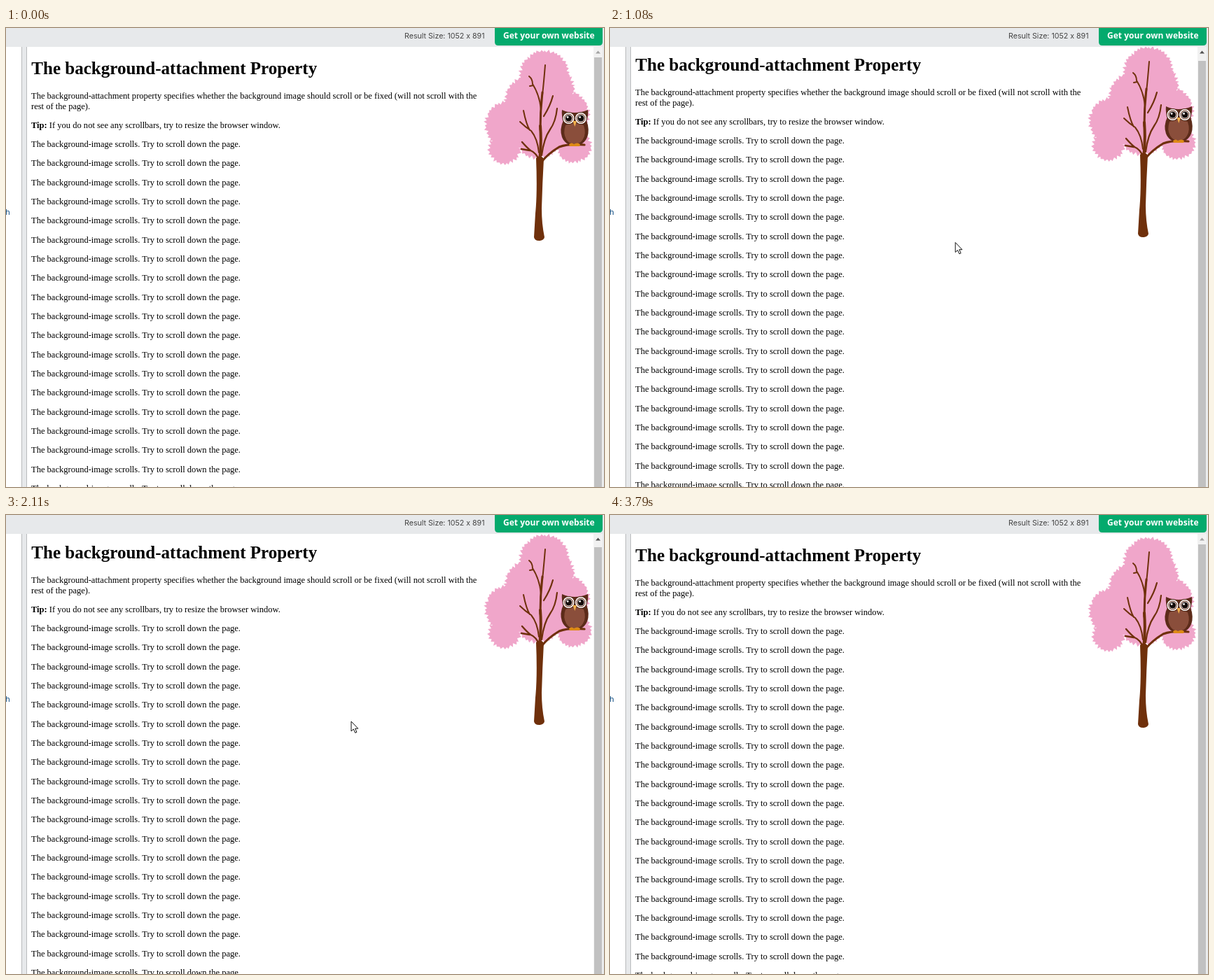
An HTML page for the animation above (4060 ms loop, 854 by 656 pixels).

```html
<!DOCTYPE html>
<html lang="en">
<head>
<meta charset="utf-8">
<title>Scrolling background</title>
<style>
  html, body { margin: 0; width: 100%; height: 100%; overflow: hidden; background: #e7e9eb; }
  svg { display: block; }
  .page { font: 12.53px "Liberation Serif", "Times New Roman", serif; fill: #000; }
  .page .title { font-size: 25.04px; font-weight: bold; }
  .bold { font-weight: bold; }
  .size { font: 10.65px Inter, sans-serif; fill: #444; }
  .button { font: bold 12.06px "Open Sans", "Noto Sans", sans-serif; fill: #fff; }
  .code { font: 11px "Noto Sans", sans-serif; fill: #0b4a80; }
  .wood { fill: none; stroke: #6f300b; stroke-linecap: round; stroke-linejoin: round; }
</style>
</head>
<body>
<svg width="854" height="656" viewBox="0 0 854 656">
  <defs>
    <clipPath id="view"><rect x="30" y="27" width="809" height="629"/></clipPath>
    <g id="eye">
      <circle r="9" fill="#4b2313"/>
      <circle r="8" fill="#fff"/>
      <circle r="6.4" fill="#6b3420"/>
      <circle r="5.4" fill="#fff"/>
      <circle r="4.6" fill="#140b08"/>
      <circle cx="-1.4" cy="-1.6" r="1.4" fill="#fff"/>
    </g>
  </defs>

  <rect width="854" height="656" fill="#e7e9eb"/>
  <rect y="27" width="22" height="629" fill="#fff"/>
  <rect x="22" y="27" width="1" height="629" fill="#b9bbbd"/>
  <rect x="29" y="27" width="1" height="629" fill="#b9bbbd"/>
  <rect x="30" y="27" width="809" height="629" fill="#fff"/>
  <text class="code" x="-1" y="266.5">h</text>
  <text class="size" x="569" y="15">Result Size: 1052 x 891</text>
  <path d="M698 0H852V20Q852 25 847 25H703Q698 25 698 20Z" fill="#04aa6d"/>
  <text class="button" x="710" y="15">Get your own website</text>

  <g clip-path="url(#view)">
    <g id="page" class="page">
      <path id="leaves" fill="#f0a6ca"/>
      <path fill="#6f300b" d="M757 186Q759 235 756 265L754 299Q755 304 761 304Q768 304 769 299Q765 280 765 258Q766 222 768 187Q763 180 757 186Z"/>
      <g class="wood">
        <path stroke-width="4" d="M762 190Q765 165 763 140"/>
        <path stroke-width="3" d="M763 145Q763 118 766 92"/>
        <path stroke-width="2" d="M766 96Q768 78 770 53M747 69Q752 73 752 80Q762 96 764 116M753 82L748 83"/>
        <path stroke-width="2" d="M734 134Q741 141 750 147Q759 158 761 178M739 118Q743 138 748 146"/>
        <path stroke-width="2.4" d="M737 163Q744 171 749 175Q757 178 762 190M736 173L748 175"/>
        <path stroke-width="2.2" d="M787 115Q785 134 777 145Q768 158 765 182M781 97Q777 112 768 126"/>
        <path stroke-width="3.2" d="M765 191Q775 179 790 170Q804 165 826 167"/>
      </g>
      <path fill="#5c2b19" d="M794 117Q802 121 812 121Q822 121 831 117Q832 125 829 132Q834 146 830 156Q825 168 812 168Q799 168 794 156Q790 145 796 132Q793 125 794 117Z"/>
      <path fill="#8a4e3b" d="M799 139Q812 133 825 139Q829 151 824 159Q820 166 812 166Q804 166 800 159Q795 150 799 139Z"/>
      <use href="#eye" x="803.5" y="129"/>
      <use href="#eye" x="821" y="129"/>
      <path fill="#f3b04b" d="M809.5 133H815L812.3 141Z"/>
      <path fill="#dd8a16" d="M804 166Q808 163 811 166Q816 163 820 166L819 169H805Z"/>
      <text class="title" x="36.3" y="66">The background-attachment Property</text>
      <text x="36" y="101">The background-attachment property specifies whether the background image should scroll or be fixed (will not scroll with the</text>
      <text x="36" y="116">rest of the page).</text>
      <text x="36" y="143"><tspan class="bold">Tip:</tspan> If you do not see any scrollbars, try to resize the browser window.</text>
    </g>
  </g>

  <rect x="839" y="27" width="13" height="629" fill="#f1f1f1"/>
  <path id="arrow" d="M842 36.5L845.5 32.5L849 36.5Z"/>
  <rect id="thumb" x="840" y="42" width="11" height="640"/>
  <path id="cursor" d="M0 0V14L3.3 11L5.7 16.3L7.9 15.3L5.6 10.2H9.8Z" fill="#fff" stroke="#111"/>
</svg>
<script>
const LOOP = 4060, STEP = 67.6;
const get = id => document.getElementById(id);
const page = get("page"), arrow = get("arrow"), thumb = get("thumb"), cursor = get("cursor");

let seed = 11;
const random = () => (seed = seed * 16807 % 2147483647) / 2147483647;

// A round clump of leaves with an uneven, toothed rim.
function clump([x, y, r]) {
  const teeth = Math.round(r * 1.1);
  let d = "";
  for (let i = 0; i < teeth * 2; i++) {
    const a = (i + random() * 0.7) * Math.PI / teeth;
    const rim = r + (i % 2 ? -1 - 3 * random() : 2 * random());
    d += (i ? "L" : "M") + (x + rim * Math.cos(a)).toFixed(1) + " " + (y + rim * Math.sin(a)).toFixed(1);
  }
  return d + "Z";
}

// Center and radius of each clump in the crown.
const crown = [
  [769, 68, 36], [748, 104, 36], [718, 138, 34], [712, 172, 23],
  [760, 154, 33], [786, 86, 26], [799, 123, 34], [811, 168, 25]
];
get("leaves").setAttribute("d", crown.map(clump).join(""));

for (let i = 0; i < 19; i++) {
  const line = document.createElementNS("http://www.w3.org/2000/svg", "text");
  line.setAttribute("x", 36);
  line.setAttribute("y", 170 + Math.round(i * 27.34));
  line.textContent = "The background-image scrolls. Try to scroll down the page.";
  page.append(line);
}

// The wheel rocks the page down and up at a steady beat.
const RANGE = 6, BEAT = 256, FIRST = 220, BEATS = 9;
function scrollAt(t) {
  const beat = (t - FIRST) / BEAT;
  if (beat < 0 || beat > BEATS) return 0;
  return Math.round(RANGE * (1 - Math.cos(beat * 2 * Math.PI)) / 2);
}

// Pointer stops: time, x, y.
const stops = [
  [0, 528, 690], [340, 496, 345], [880, 492, 314], [1350, 495, 295], [1620, 496, 293],
  [2095, 493, 295], [2500, 640, 690], [3000, 850, 670], [3040, 849, 646],
  [3245, 808, 628], [3450, 822, 670], [LOOP, 822, 670]
];
function pointerAt(t) {
  const i = stops.findIndex(s => s[0] > t);
  const [t0, x0, y0] = stops[i - 1], [t1, x1, y1] = stops[i];
  const f = (t - t0) / (t1 - t0), ease = f * f * (3 - 2 * f);
  return [x0 + (x1 - x0) * ease, y0 + (y1 - y0) * ease];
}

function draw(now) {
  const t = Math.floor((now % LOOP + 5) / STEP) * STEP % LOOP;
  const s = scrollAt(t), [x, y] = pointerAt(t);
  const hovered = t > 3100 && t < 3780;
  page.setAttribute("transform", `translate(0 ${-s})`);
  thumb.setAttribute("y", 42 + s);
  thumb.setAttribute("fill", hovered ? "#b8b8b8" : "#c1c1c1");
  arrow.setAttribute("fill", s ? "#505050" : "#a3a3a3");
  cursor.setAttribute("transform", `translate(${x} ${y})`);
}

const start = performance.now();
function tick() {
  draw(performance.now() - start);
  requestAnimationFrame(tick);
}
tick();
</script>
</body>
</html>
```
